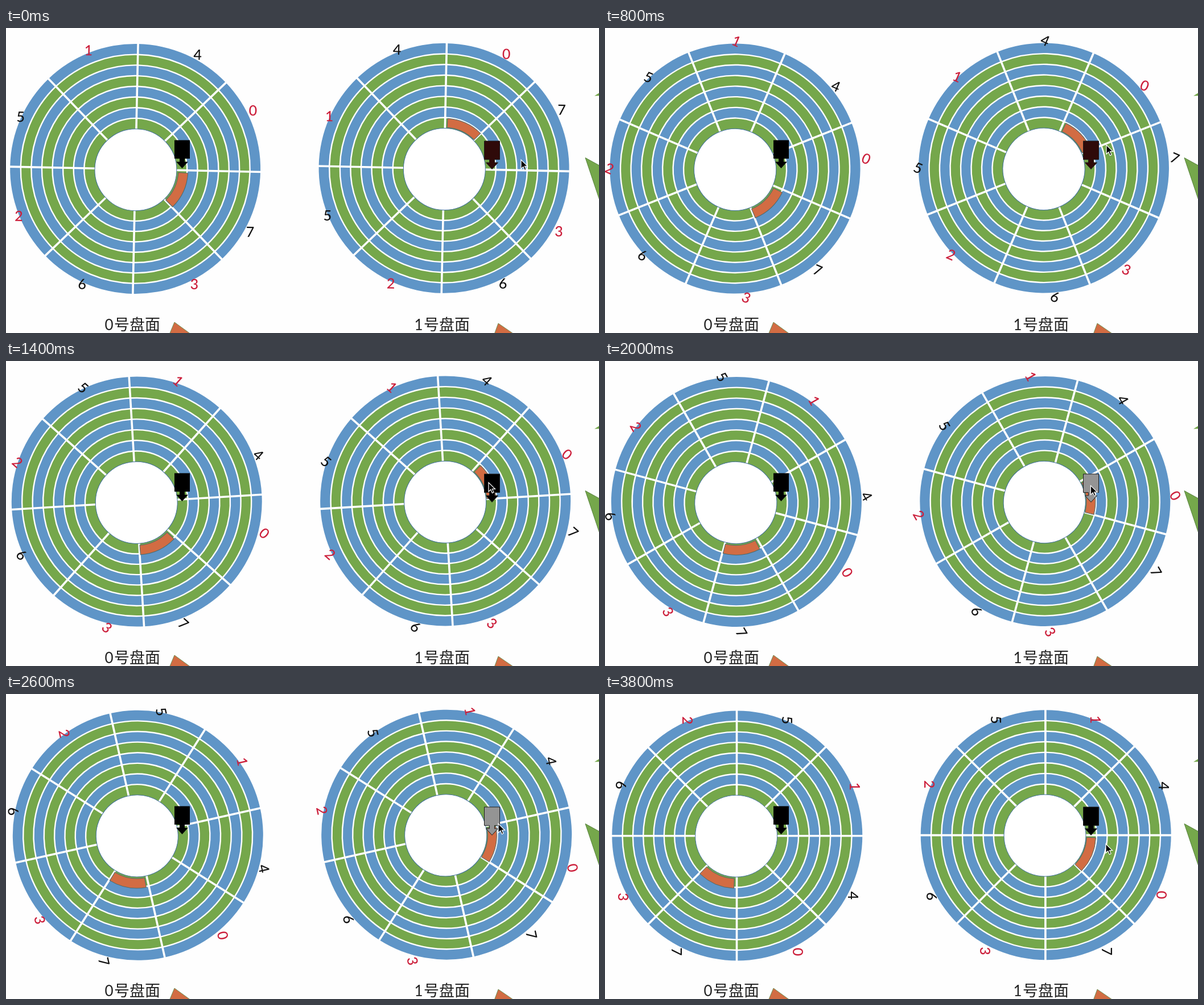
Write an HTML page with a canvas that moves like this. It is 1042 px wide and 537 px high and loops after 4000 ms.

```html
<!DOCTYPE html>
<html lang="zh">
<meta charset="utf-8">
<style>
html, body { margin: 0; width: 100%; height: 100%; overflow: hidden; background: #fefefe; }
canvas { display: block; }
</style>
<canvas id="stage" width="1042" height="537"></canvas>
<script>
const ctx = document.getElementById('stage').getContext('2d');
const LOOP = 4000, STEP = 200, RAD = Math.PI / 180;
const BLUE = '#5f95c7', GREEN = '#75a74b', ORANGE = '#d26c43', EDGE = '#41719c';
const DIGITS = '14073625';

// Pointer stops: time, x, y
const STOPS = [[0, 905, 232], [800, 881, 206], [1400, 848, 214],
               [2400, 857, 223], [3000, 881, 239], [3800, 880, 264]];

const cos = deg => Math.cos(deg * RAD);
const sin = deg => Math.sin(deg * RAD);

// A quarter turn with a slow start
const turn = t => Math.min(90, 1.2 + 0.029 * t - 1.1 * sin(0.12 * t));

function pointerAt(t) {
  const i = STOPS.findIndex(stop => stop[0] >= t) || 1;
  const [t0, x0, y0] = STOPS[i - 1], [t1, x1, y1] = STOPS[i];
  const p = (t - t0) / (t1 - t0);
  return [x0 + (x1 - x0) * p, y0 + (y1 - y0) * p];
}

function paint(fill, stroke, width = 1) {
  ctx.fillStyle = fill;
  ctx.fill();
  if (!stroke) return;
  ctx.strokeStyle = stroke;
  ctx.lineWidth = width;
  ctx.stroke();
}

function shape(points, fill, stroke, width) {
  ctx.beginPath();
  points.forEach(([x, y]) => ctx.lineTo(x, y));
  ctx.closePath();
  paint(fill, stroke, width);
}

function circle(x, y, r, fill, stroke, width) {
  ctx.beginPath();
  ctx.arc(x, y, r, 0, 7);
  paint(fill, stroke, width);
}

function rings() {
  // The centres drift slightly from the rim to the hub
  for (let k = 0; k < 8; k++) {
    circle(-1.9 + k * 0.09, -3.3 + k * 0.2, 220 - k * 18.5,
      k % 2 ? GREEN : BLUE, k && '#fff', 2.4);
  }
  ctx.strokeStyle = '#fff';
  ctx.lineWidth = 3.6;
  ctx.beginPath();
  for (let a = 0; a < 360; a += 45) {
    ctx.moveTo(-1.6 + 70 * cos(a), -2.5 + 70 * sin(a));
    ctx.lineTo(-1.6 + 223 * cos(a), -2.5 + 223 * sin(a));
  }
  ctx.stroke();
  circle(-1.1, -1.6, 72, '#fff', EDGE);
}

function sector(from, inner, outer) {
  const start = from * RAD, end = (from + 41.5) * RAD;
  ctx.beginPath();
  ctx.arc(-1.1, -1.6, outer, start, end);
  ctx.arc(-1.1, -1.6, inner, end, start, true);
  ctx.closePath();
  paint(ORANGE, '#4d6a6a');
}

// Labels sit off-centre, pulled together in pairs
function labels(shift) {
  ctx.font = '500 25px Lato, Carlito, sans-serif';
  ctx.textAlign = 'center';
  for (let k = 0; k < 8; k++) {
    const pull = (k % 2 ? 3 : -3) * (1 + cos(45 * k - 120));
    const a = 45 * k - 112.5 + pull;
    const digit = DIGITS[(k + shift) % 8];
    ctx.fillStyle = digit < 4 ? '#cc1f3b' : '#111';
    ctx.fillText(digit, 3.4 + 226 * cos(a), 5 + 226 * sin(a));
  }
}

function disk(x, y, angle, shift, ...band) {
  ctx.save();
  ctx.translate(x, y);
  ctx.rotate(angle * RAD);
  rings();
  sector(...band);
  labels(shift);
  ctx.restore();
}

function head(x, y, fill, stroke) {
  const half = [[13.5, 0], [13.5, 32.5], [4.5, 32.5], [4.5, 38], [10.5, 38], [0, 49.5]];
  const left = half.map(([px, py]) => [-px, py]).reverse();
  shape([...half, ...left].map(([px, py]) => [x + px, y + py]), fill, stroke);
}

// Grey while the orange sector passes underneath
function headColor(t) {
  if (t >= 1600 && t < 3000) return '#949494';
  return t < 1200 ? '#2f0a09' : '#000';
}

function pointer(x, y) {
  const outline = [[0, 0], [0, 16], [3.8, 12.4], [6.4, 18.4], [9, 17.2], [6.5, 11.4], [11.5, 11.4]];
  shape(outline.map(([px, py]) => [x + px, y + py]), '#000', '#fff', 1.2);
}

function caption(digit, x) {
  ctx.fillStyle = '#222';
  ctx.textAlign = 'left';
  ctx.font = '26px Lato, Carlito, sans-serif';
  ctx.fillText(digit, x, 532);
  ctx.font = '300 27px "Noto Sans CJK SC", "Noto Sans CJK", sans-serif';
  ctx.fillText('号盘面', x + 16.5, 531.5);
}

function draw(t) {
  ctx.fillStyle = '#fefefe';
  ctx.fillRect(0, 0, 1042, 537);

  disk(229, 251.3, turn(t), 0, 2.5, 75, 92);
  disk(771.4, 250.2, turn(t), 1, -87.5, 73.5, 89.5);

  caption('0', 173.5);
  caption('1', 717.5);
  shape([[296, 518], [286, 542], [329, 542]], ORANGE, '#6f8f55');
  shape([[865, 520], [857, 542], [897, 542]], ORANGE, '#6f8f55');
  shape([[1018, 228.5], [1048, 245], [1048, 318]], GREEN, '#55803a');
  shape([[1034, 119.5], [1046, 112], [1046, 119]], GREEN);

  head(309.5, 197.5, '#000');
  head(854, 199, headColor(t), '#1c1c1c');
  pointer(...pointerAt(t));
}

function tick(now) {
  draw(Math.floor(now % LOOP / STEP) * STEP);
  requestAnimationFrame(tick);
}
requestAnimationFrame(tick);
</script>
</html>
```
